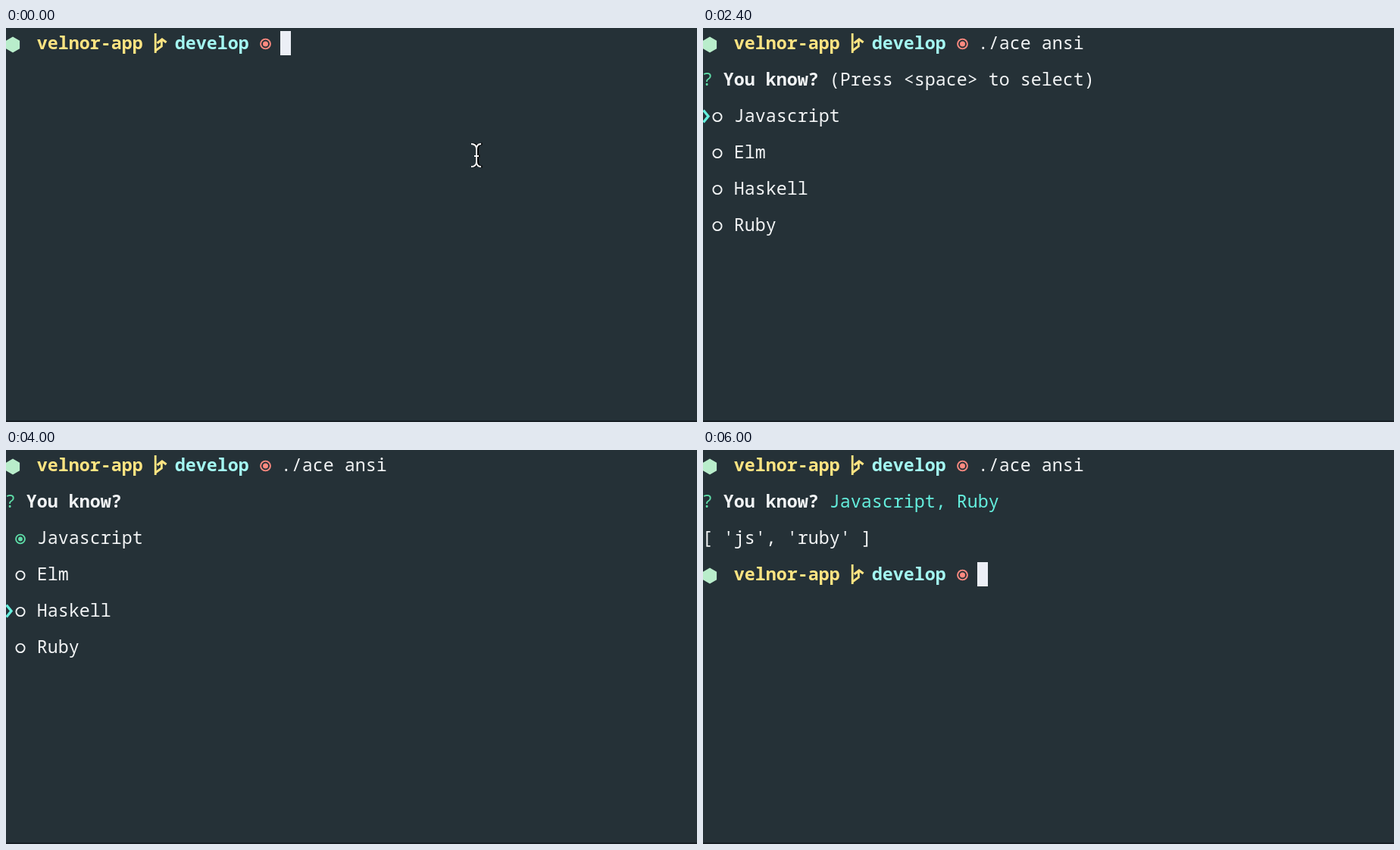
An HTML page with a canvas for the animation above (6100 ms loop, 912 by 520 pixels).

```html
<!DOCTYPE html>
<html lang="en">
<head>
<meta charset="utf-8">
<title>Terminal checkbox prompt</title>
<style>
html, body { margin: 0; width: 100%; height: 100%; overflow: hidden; background: #253137; }
canvas { display: block; }
</style>
</head>
<body>
<canvas id="stage" width="912" height="520"></canvas>
<script>
const ctx = document.getElementById('stage').getContext('2d');

const LOOP = 6100;
const CELL = 14, LEFT = -2, ROW = 48, BASE = 28;
const FONT = '23.333px "Noto Sans Mono", "DejaVu Sans Mono", monospace';
const COLOR = {
  back: '#253137', edge: '#182025', white: '#f2f4f5', block: '#eceff6',
  yellow: '#ffe482', cyan: '#a4f8f2', red: '#ff8a80', mint: '#b9edcb',
  green: '#5fdda8', aqua: '#64eedd'
};

const COMMAND = './ace ansi';
const CHOICES = ['Javascript', 'Elm', 'Haskell', 'Ruby'];

// Moments of the session, in ms.
const AT = {
  type: 800, enter: 1700, ask: 2300, pickFirst: 3100,
  moves: [3700, 3900, 4100], pickLast: 4400, answer: 5100, prompt: 5500
};

const colX = col => LEFT + col * CELL;
const rowY = row => BASE + row * ROW;

function text(string, col, row, color = COLOR.white, weight = 500) {
  ctx.font = `${weight} ${FONT}`;
  ctx.fillStyle = color;
  ctx.fillText(string, colX(col) + 0.8, rowY(row));
}

function block(col, row) {
  ctx.fillStyle = COLOR.block;
  ctx.fillRect(colX(col), rowY(row) - 24, CELL, 32);
}

function line(points, width, color) {
  ctx.beginPath();
  points.forEach(([x, y]) => ctx.lineTo(x, y));
  ctx.lineWidth = width;
  ctx.strokeStyle = color;
  ctx.stroke();
}

function ring(x, y, radius, color, dot = 0) {
  ctx.beginPath();
  ctx.arc(x, y, radius, 0, Math.PI * 2);
  ctx.lineWidth = 1.9;
  ctx.strokeStyle = color;
  ctx.stroke();
  if (!dot) return;
  ctx.beginPath();
  ctx.arc(x, y, dot, 0, Math.PI * 2);
  ctx.fillStyle = color;
  ctx.fill();
}

function hexagon(x, y, radius) {
  ctx.beginPath();
  for (let i = 0; i < 6; i++) {
    const angle = Math.PI / 6 + i * Math.PI / 3;
    ctx.lineTo(x + radius * Math.cos(angle), y + radius * Math.sin(angle));
  }
  ctx.fillStyle = COLOR.mint;
  ctx.fill();
}

function branch(y) {
  line([[197.2, y - 21], [197.2, y + 5]], 2.8, COLOR.yellow);
  line([[197.2, y + 2], [205.4, y - 4], [205.4, y - 13]], 2.8, COLOR.yellow);
  line([[199.6, y - 8], [206, y - 13], [211.6, y - 9]], 3.2, COLOR.yellow);
}

function promptLine(row) {
  const y = rowY(row);
  hexagon(9, y - 6, 10.5);
  text('velnor-app', 3, row, COLOR.yellow, 600);
  branch(y);
  text('develop', 16, row, COLOR.cyan, 600);
  ring(342.5, y - 7, 6.4, COLOR.red, 3.5);
}

function pointer() {
  const shape = (dx, width, color) => {
    ctx.beginPath();
    ctx.moveTo(614 + dx, 153);
    ctx.quadraticCurveTo(621 + dx, 153, 621 + dx, 160);
    ctx.lineTo(621 + dx, 176);
    ctx.quadraticCurveTo(621 + dx, 183, 614 + dx, 183);
    ctx.moveTo(627 + dx, 153);
    ctx.quadraticCurveTo(621 + dx, 153, 621 + dx, 160);
    ctx.moveTo(621 + dx, 176);
    ctx.quadraticCurveTo(621 + dx, 183, 627 + dx, 183);
    ctx.moveTo(618 + dx, 169);
    ctx.lineTo(624 + dx, 169);
    ctx.lineWidth = width;
    ctx.strokeStyle = color;
    ctx.stroke();
  };
  shape(1.6, 2.8, '#080a0b');
  shape(0, 1.8, '#ffffff');
}

function question() {
  text('?', 0, 1, COLOR.green);
  text('You know?', 2, 1, COLOR.white, 600);
}

function checklist(t) {
  const active = AT.moves.filter(moment => t >= moment).length;
  const picked = [t >= AT.pickFirst, false, false, t >= AT.pickLast];
  question();
  if (t < AT.pickFirst) text('(Press <space> to select)', 12, 1);
  CHOICES.forEach((label, i) => {
    const row = i + 2, y = rowY(row) - 6.5;
    if (i === active) line([[0.5, y - 9], [7, y - 1], [0.5, y + 7]], 3.4, COLOR.aqua);
    if (picked[i]) ring(19, y, 5.9, COLOR.green, 2.9);
    else ring(19, y, 5.6, COLOR.white);
    text(label, 3, row);
  });
}

function result(t) {
  question();
  text('Javascript, Ruby', 12, 1, COLOR.aqua);
  text("[ 'js', 'ruby' ]", 0, 2);
  if (t < AT.prompt) return block(0, 3);
  promptLine(3);
  block(26, 3);
}

function draw(t) {
  ctx.fillStyle = COLOR.back;
  ctx.fillRect(0, 0, 912, 520);
  ctx.fillStyle = COLOR.edge;
  ctx.fillRect(0, 518, 912, 2);

  promptLine(0);
  const steps = Math.floor((t - AT.type) / 100) + 1;
  const typed = Math.max(0, Math.min(COMMAND.length, Math.round(steps * 2.5)));
  text(COMMAND.slice(0, typed), 26, 0);

  if (t < AT.type) pointer();
  if (t < AT.enter) block(26 + typed, 0);
  else if (t < AT.ask) block(0, 1);
  else if (t < AT.answer) checklist(t);
  else result(t);
}

function tick(now) {
  draw(now % LOOP);
  requestAnimationFrame(tick);
}
requestAnimationFrame(tick);
</script>
</body>
</html>
```
